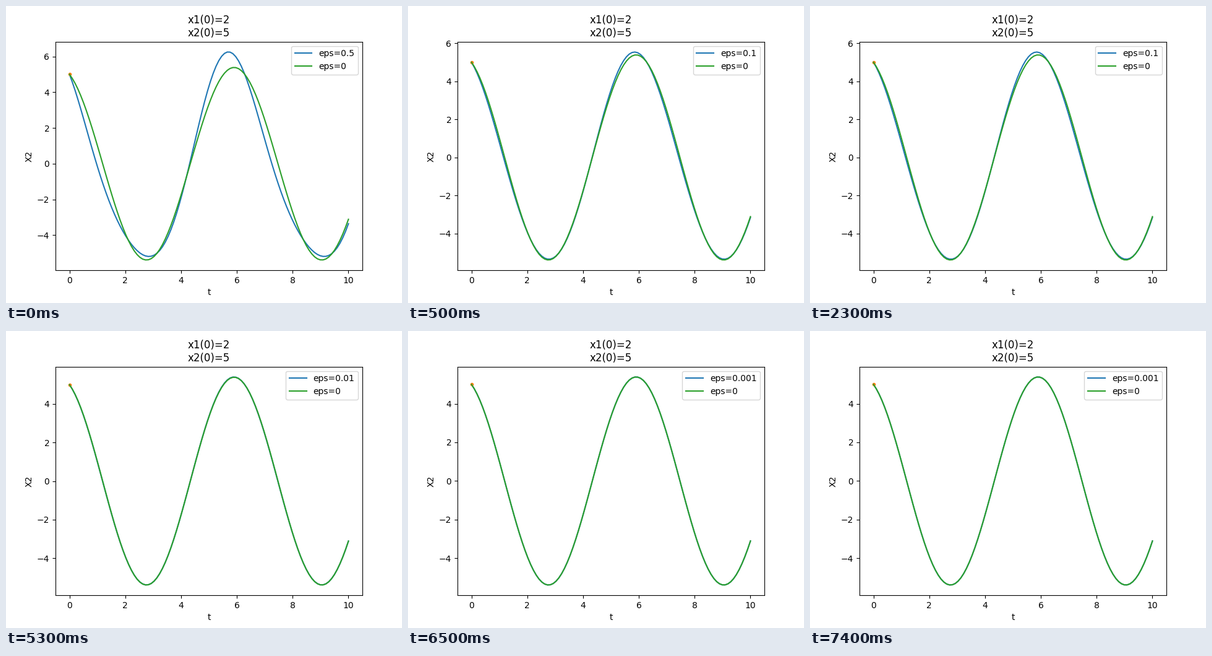
A matplotlib script that plays this animation: 640x480 px, repeating every 8 s.

```python
import numpy as np
import matplotlib.pyplot as plt
from matplotlib.animation import FuncAnimation

STEP_MS = 500
FRAMES = 16
X1, X2 = 2, 5
# (first step, eps label)
STAGES = [(0, "0.5"), (1, "0.1"), (7, "0.01"), (13, "0.001")]

t = np.linspace(0, 10, 100)
fig, ax = plt.subplots(figsize=(6.4, 4.8), dpi=100)


def solution(eps):
    """Oscillator velocity with a second-harmonic perturbation."""
    free = X2 * np.cos(t) - X1 * np.sin(t)
    return free - 4 / 3 * eps * (np.sin(t) + np.sin(2 * t))


def draw(step):
    label = [name for start, name in STAGES if start <= step][-1]
    ax.clear()
    ax.plot(t, solution(float(label)), color="C0", label=f"eps={label}")
    ax.plot(0, X2, ".", color="C1")
    ax.plot(t, solution(0), color="C2", label="eps=0")
    ax.set_title(f"x1(0)={X1}\nx2(0)={X2}")
    ax.set_xlabel("t")
    ax.set_ylabel("X2")
    ax.legend(loc="upper right")
    return ax.get_children()


anim = FuncAnimation(fig, draw, frames=FRAMES, init_func=lambda: draw(0),
                     interval=STEP_MS, repeat=True, repeat_delay=0)
plt.show()
```
